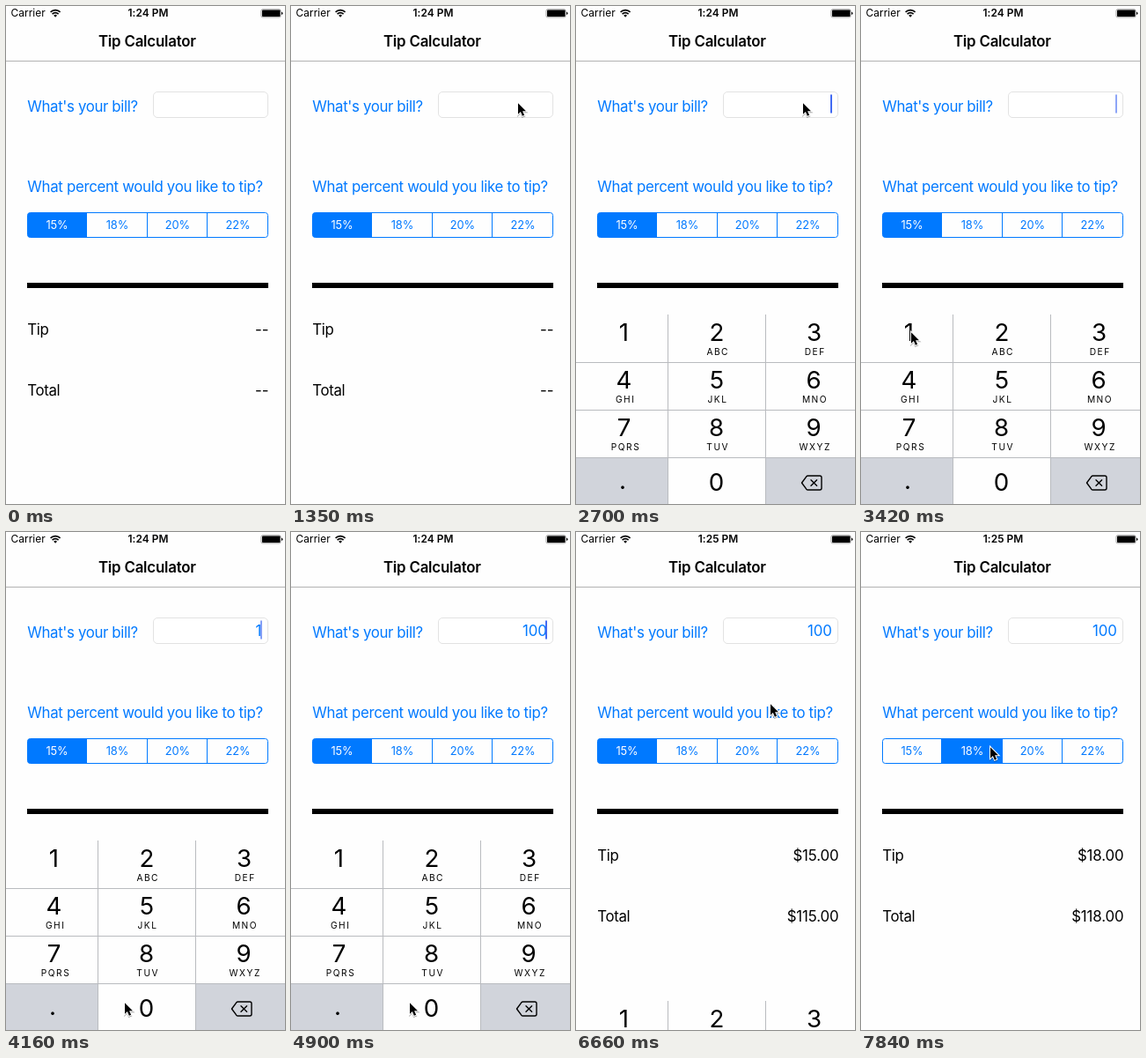
Animation of 317 by 565 pixels, one loop 7990 ms. Source, as an HTML page:

```html
<!DOCTYPE html>
<html lang="en">
<head>
<meta charset="utf-8">
<title>Tip Calculator</title>
<style>
  html, body { margin: 0; width: 100%; height: 100%; overflow: hidden; background: #fefefe; }
  svg { display: block; width: 317px; height: 565px; font: 16.83px Inter, "Liberation Sans", sans-serif; letter-spacing: -.36px; }

  .blue { fill: #0079ff; }
  .line { fill: none; stroke: #0079ff; }
  .end { text-anchor: end; letter-spacing: -.12px; }
  .mid { text-anchor: middle; }
  .bold { font-weight: 600; }
  .title { letter-spacing: -.19px; }
  .ask { letter-spacing: -.32px; }
  .status { font-size: 11.9px; letter-spacing: .05px; }
  .seg { font-size: 12.87px; letter-spacing: -.1px; text-anchor: middle; }
  .num { font-size: 27.7px; letter-spacing: 0; text-anchor: middle; }
  .abc { font-size: 10.2px; letter-spacing: 1.5px; text-anchor: middle; }

  .a { animation: 7.99s step-end infinite; }
  .pointer { animation-name: pointer; }
  .keys { animation-name: keys; }
  .caret { animation-name: caret; }
  .press1 { animation-name: press1; }
  .press0 { animation-name: press0; }
  .b1 { animation-name: b1; }
  .b10 { animation-name: b10; }
  .b100 { animation-name: b100; }
  .before { animation-name: before; }
  .after { animation-name: after; }
  .empty { animation-name: empty; }
  .t15 { animation-name: t15; }
  .t18 { animation-name: t18; }
  .fill15 { animation-name: fill15; }
  .fill18 { animation-name: fill18; }
  .label15 { animation-name: label15; }
  .label18 { animation-name: label18; }

  @keyframes pointer {
    0% { transform: translate(266px, 185px); opacity: 0; }
    9.3% { transform: translate(266px, 185px); opacity: 1; }
    11.2% { transform: translate(263px, 152px); }
    13.1% { transform: translate(259px, 124px); }
    15% { transform: translate(257px, 112px); }
    16.8% { transform: translate(257px, 109px); }
    35.5% { transform: translate(240px, 133px); }
    37.4% { transform: translate(182px, 212px); }
    39.1% { transform: translate(112px, 306px); }
    41% { transform: translate(66px, 358px); }
    42.8% { transform: translate(56px, 369px); }
    46.5% { transform: translate(60px, 380px); }
    48.3% { transform: translate(84px, 437px); }
    50.1% { transform: translate(120px, 510px); }
    52% { transform: translate(134px, 533px); }
    68.5% { transform: translate(136px, 525px); }
    70.4% { transform: translate(144px, 500px); }
    72.3% { transform: translate(156px, 465px); }
    74% { transform: translate(176px, 396px); }
    75.9% { transform: translate(200px, 296px); }
    77.8% { transform: translate(216px, 220px); }
    79.5% { transform: translate(220px, 194px); }
    87.1% { transform: translate(207px, 204px); }
    88.8% { transform: translate(178px, 226px); }
    90.7% { transform: translate(154px, 240px); }
    92.6%, 100% { transform: translate(146px, 243px); opacity: 1; }
  }
  @keyframes keys {
    0% { transform: translateY(217px); }
    30% { transform: translateY(112px); }
    31.9% { transform: translateY(24px); }
    33.7% { transform: none; }
    81.4% { transform: translateY(110px); }
    83.3% { transform: translateY(182px); }
    85.2% { transform: translateY(212px); }
    87.1%, 100% { transform: translateY(217px); }
  }
  @keyframes caret {
    0% { opacity: 0; }
    30% { opacity: 1; }
    37.4% { opacity: .5; }
    39.1% { opacity: 0; }
    42.8% { opacity: .6; }
    44.6% { opacity: 1; }
    52% { opacity: .65; }
    53.8% { opacity: 1; }
    68.5% { opacity: .5; }
    70.4% { opacity: 0; }
    75.9% { opacity: 1; }
    81.4%, 100% { opacity: 0; }
  }
  @keyframes press1 { 0%, 46.5%, 100% { opacity: 0; } 44.6% { opacity: 1; } }
  @keyframes press0 { 0%, 55.6%, 61.3%, 100% { opacity: 0; } 53.8%, 59.4% { opacity: 1; } }
  @keyframes b1 { 0%, 55.6%, 100% { opacity: 0; } 46.5% { opacity: 1; } }
  @keyframes b10 { 0%, 61.3%, 100% { opacity: 0; } 55.6% { opacity: 1; } }
  @keyframes b100 { 0% { opacity: 0; } 61.3%, 100% { opacity: 1; } }
  @keyframes before { 0% { opacity: 1; } 64.9%, 100% { opacity: 0; } }
  @keyframes after { 0% { opacity: 0; } 64.9%, 100% { opacity: 1; } }
  @keyframes empty { 0% { opacity: 1; } 61.3%, 100% { opacity: 0; } }
  @keyframes t15 { 0%, 96.3%, 100% { opacity: 0; } 61.3% { opacity: 1; } }
  @keyframes t18 { 0% { opacity: 0; } 96.3%, 100% { opacity: 1; } }
  @keyframes fill15 { 0% { opacity: 1; } 96.3% { opacity: .5; } 98.1%, 100% { opacity: 0; } }
  @keyframes fill18 { 0% { opacity: 0; } 94.4% { opacity: .15; } 96.3% { opacity: .5; } 98.1%, 100% { opacity: 1; } }
  @keyframes label15 { 0% { fill: #fff; } 98.1%, 100% { fill: #0079ff; } }
  @keyframes label18 { 0% { fill: #0079ff; } 96.3%, 100% { fill: #fff; } }
</style>
</head>
<body>
<svg viewBox="0 0 317 565">
  <rect width="317" height="565" fill="#fefefe"/>

  <!-- status and title bar -->
  <rect y="62" width="317" height="1" fill="#b2b2b2"/>
  <g class="status">
    <text x="5.5" y="12.4">Carrier</text>
    <g class="bold mid">
      <text class="a before" x="161.5" y="12.4">1:24 PM</text>
      <text class="a after" x="161.5" y="12.4">1:25 PM</text>
    </g>
  </g>
  <g fill="none" stroke="#000" stroke-width="1.6">
    <path d="M50.6 6.9a7.7 7.7 0 0 1 11 0M52.6 9.1a4.9 4.9 0 0 1 7 0"/>
    <path d="M54.2 10.7a2.7 2.7 0 0 1 3.8 0l-1.9 2z" fill="#000" stroke="none"/>
  </g>
  <rect x="290" y="3.8" width="22" height="9" rx="1.6" fill="none" stroke="#777" stroke-width=".7"/>
  <rect x="291" y="4.5" width="20.500" height="7.500" rx=".8"/>
  <path d="M313 6.6q1.4 .4 1.4 1.7t-1.4 1.7z"/>
  <text class="bold mid title" x="160.4" y="46">Tip Calculator</text>

  <!-- bill -->
  <text class="blue" x="24.3" y="120">What's your bill?</text>
  <rect x="167.5" y="97.5" width="130" height="29" rx="4.5" fill="#fff" stroke="#e2e2e2"/>
  <g class="blue end">
    <text class="a b1" x="290.3" y="117.5">1</text>
    <text class="a b10" x="290.7" y="117.5">10</text>
    <text class="a b100" x="290.7" y="117.5">100</text>
  </g>
  <rect class="a caret" x="289" y="100.5" width="2" height="21" fill="#426bf2"/>

  <!-- percent -->
  <text class="blue ask" x="24.3" y="211">What percent would you like to tip?</text>
  <path class="blue a fill15" d="M92 234.5H27.5a3 3 0 0 0-3 3v22a3 3 0 0 0 3 3H92z"/>
  <rect class="blue a fill18" x="91" y="234.5" width="70" height="28"/>
  <rect class="line" x="24.5" y="234.5" width="273" height="28" rx="3"/>
  <path class="line" d="M91.5 234.5v28M160.5 234.5v28M228.5 234.5v28"/>
  <g class="seg blue">
    <text class="a label15" x="58" y="253.2">15%</text>
    <text class="a label18" x="126.4" y="253.2">18%</text>
    <text x="195" y="253.2">20%</text>
    <text x="263.6" y="253.2">22%</text>
  </g>

  <!-- result -->
  <rect x="24" y="314" width="274" height="6"/>
  <text x="24.3" y="373">Tip</text>
  <text x="24.3" y="442">Total</text>
  <g class="end">
    <g class="a empty"><text x="298.3" y="373">--</text><text x="298.3" y="442">--</text></g>
    <g class="a t15"><text x="298.5" y="373">$15.00</text><text x="298.5" y="442">$115.00</text></g>
    <g class="a t18"><text x="298.5" y="373">$18.00</text><text x="298.5" y="442">$118.00</text></g>
  </g>

  <!-- keypad -->
  <g class="a keys">
    <rect y="350" width="317" height="215" fill="#fefefe"/>
    <path d="M0 512h104v53H0zM216 512h101v53H216z" fill="#d1d4db"/>
    <rect class="a press1" y="350" width="104" height="54" fill="#d1d4db"/>
    <rect class="a press0" x="105" y="513" width="110" height="52" fill="#d1d4db"/>
    <path d="M104.5 350v215M215.5 350v215M0 404.5H317M0 458.5H317M0 512.5H317" fill="none" stroke="#b9bbbf"/>
    <g class="num">
      <text x="54.5" y="380">1</text><text x="160" y="380">2</text><text x="270.5" y="380">3</text>
      <text x="54.5" y="434">4</text><text x="160" y="434">5</text><text x="270" y="434">6</text>
      <text x="54.5" y="488">7</text><text x="159.5" y="488">8</text><text x="270" y="488">9</text>
      <text x="53" y="548">.</text><text x="159.5" y="550">0</text>
    </g>
    <g class="abc">
      <text x="161.2" y="395.5">ABC</text><text x="271.7" y="395.5">DEF</text>
      <text x="56.2" y="449.5">GHI</text><text x="161" y="449.5">JKL</text><text x="271.5" y="449.5">MNO</text>
      <text x="56.5" y="503.5">PQRS</text><text x="161.2" y="503.5">TUV</text><text x="271.7" y="503.5">WXYZ</text>
    </g>
    <path d="M263.5 533H277q2 0 2 2v12q0 2-2 2H263.5q-1 0-1.7-.8L256.500 541l5.3-7.2q.7-.8 1.7-.8zM267 537.7l6.6 6.6M273.6 537.7l-6.6 6.6"
      fill="none" stroke="#000" stroke-width="1.4" stroke-linejoin="round" stroke-linecap="round"/>
  </g>

  <path class="a pointer" d="M1 1.200V13.700l2.900-2.700 2 4.700 2.200-.9-2-4.600h3.900z" stroke="#fff" stroke-width="2" paint-order="stroke"
    style="filter: drop-shadow(0 1px .7px rgba(0, 0, 0, .35))"/>
</svg>
</body>
</html>
```
